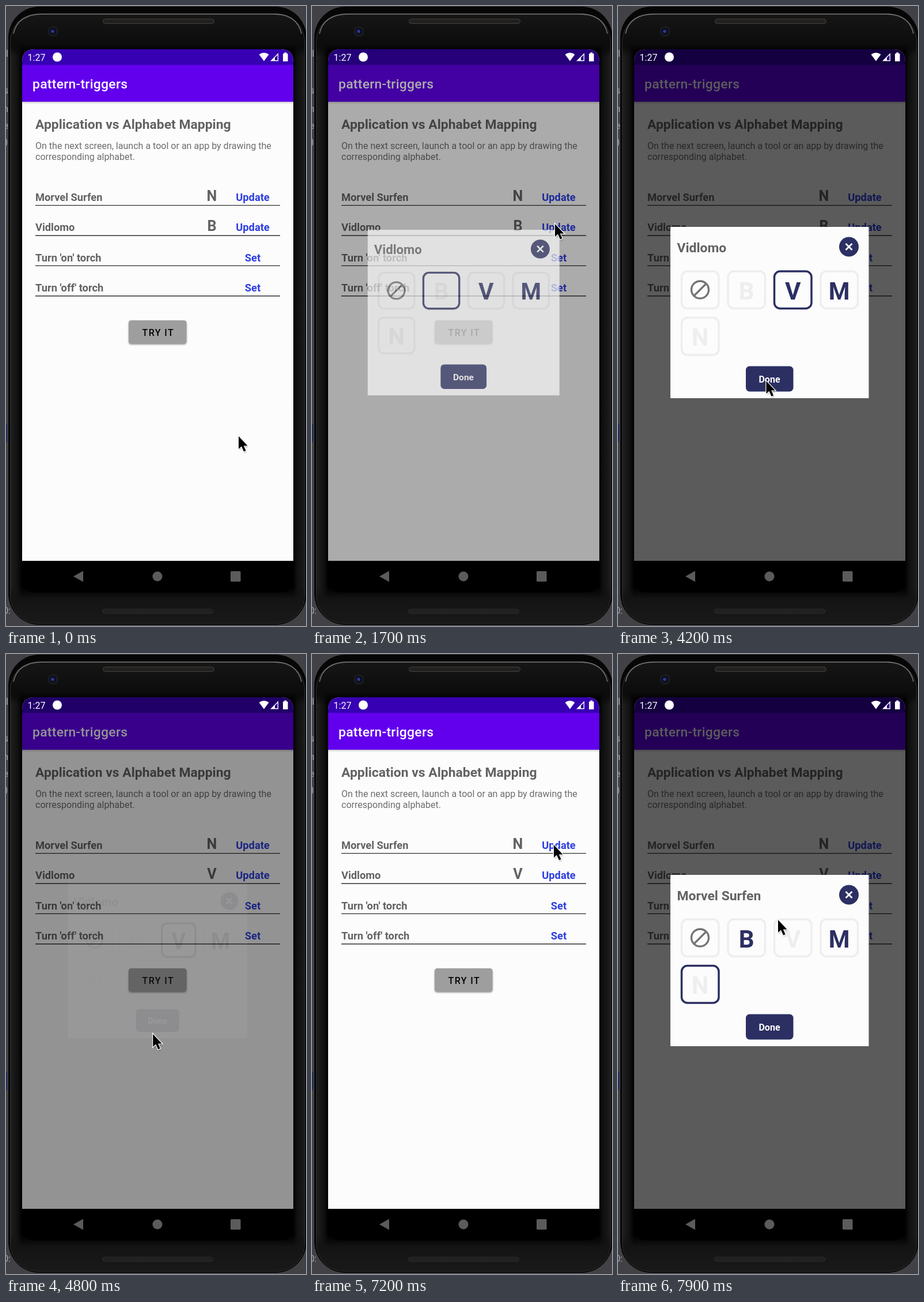
An HTML page for the animation above (8000 ms loop, 521 by 1075 pixels).

```html
<!DOCTYPE html>
<html lang="en">
<head>
<meta charset="utf-8">
<title>pattern-triggers</title>
<style>
  html, body { margin: 0; width: 100%; height: 100%; overflow: hidden; background: #424246; }
  svg { display: block; width: 521px; height: 1075px; }
  text { font-family: Roboto, sans-serif; white-space: pre; }
  .bold { font-weight: 700; }
  .mid { text-anchor: middle; }
  .title { font-size: 22.9px; font-weight: 700; fill: #626262; }
  .body { font-size: 16.04px; fill: #6d6d6d; }
  .row { font-size: 18.3px; font-weight: 700; fill: #626262; }
  .key { font-size: 25.2px; font-weight: 700; fill: #626262; }
  .link { font-size: 18.3px; font-weight: 700; fill: #2c3fe0; }
  .glyph { font-size: 42px; font-weight: 700; }
  .edge { font-size: 16px; fill: #a4a4a8; text-anchor: end; }
</style>
</head>
<body>
<svg viewBox="0 0 521 1075">
  <defs>
    <linearGradient id="side">
      <stop offset="0" stop-color="#202020"/><stop offset=".026" stop-color="#101010"/>
      <stop offset=".04" stop-color="#000"/><stop offset=".96" stop-color="#000"/>
      <stop offset=".975" stop-color="#101010"/><stop offset="1" stop-color="#1c1c1c"/>
    </linearGradient>
    <linearGradient id="ends" x2="0" y2="1">
      <stop offset="0" stop-color="#161616"/><stop offset=".05" stop-color="#0c0c0c"/>
      <stop offset=".07" stop-color="#000" stop-opacity="0"/>
      <stop offset=".94" stop-color="#101010" stop-opacity="0"/>
      <stop offset=".96" stop-color="#141414"/><stop offset="1" stop-color="#191919"/>
    </linearGradient>
    <linearGradient id="barShadow" x2="0" y2="1">
      <stop offset="0" stop-opacity=".2"/><stop offset="1" stop-opacity="0"/>
    </linearGradient>
    <pattern id="mesh" width="3" height="3" patternUnits="userSpaceOnUse">
      <rect width="3" height="3" fill="#1b1b1b"/><circle cx="1.5" cy="1.5" r=".8" fill="#383838"/>
    </pattern>
    <clipPath id="screen">
      <path d="M28 1017V97Q28 75 50 75H477Q499 75 499 97V993Q499 1017 475 1017H52Q28 1017 28 993Z"/>
    </clipPath>
    <filter id="soft" x="-50%" y="-50%" width="200%" height="200%"><feGaussianBlur stdDeviation="1.6"/></filter>
  </defs>

  <!-- Desktop and phone body -->
  <rect width="521" height="1075" fill="#424246"/>
  <g class="edge">
    <text x="4" y="88">l</text><text x="4" y="152">s</text><text x="4" y="184">n</text>
    <text x="4" y="213">e</text><text x="3" y="241">)</text><text x="8" y="1054">0:</text>
  </g>
  <rect y="725" width="2" height="31" fill="#1d2a60"/>
  <rect x="4" y="1" width="518" height="1072" rx="54" fill="#060606"/>
  <rect x="7.5" y="13.5" width="511" height="1057" rx="48" fill="url(#side)"/>
  <rect x="7.5" y="13.5" width="511" height="1057" rx="48" fill="url(#ends)" stroke="#303030"/>
  <path d="M13 48Q20 14 64 14H464Q506 14 513 48" fill="none" stroke="#777" stroke-width="1.5"/>
  <rect x="168.5" y="22.5" width="193" height="8" rx="4" fill="url(#mesh)" stroke="#4a423b"/>
  <rect x="167.5" y="1045.5" width="192" height="8" rx="4" fill="url(#mesh)" stroke="#292929"/>
  <circle cx="81.5" cy="44" r="9.5" fill="#191a20"/>
  <circle cx="81.5" cy="44" r="5.5" fill="#0a0b1c"/>
  <circle cx="81" cy="44" r="2.8" fill="#2b3c94"/>

  <g clip-path="url(#screen)">
    <rect x="28" y="75" width="471" height="887" fill="#fcfcfc"/>
    <rect x="28" y="75" width="471" height="27" fill="#3700b3"/>
    <rect x="28" y="102" width="471" height="64" fill="#6200ee"/>
    <rect x="28" y="166" width="471" height="4" fill="url(#barShadow)"/>
    <text x="46" y="143" font-size="22.9" font-weight="500" letter-spacing=".286" fill="#fff">pattern-triggers</text>

    <text class="title" x="51" y="213">Application vs Alphabet Mapping</text>
    <text class="body" x="51" y="248">On the next screen, launch a tool or an app by drawing the</text>
    <text class="body" x="51" y="267">corresponding alphabet.</text>
    <g id="rows"></g>

    <rect x="213" y="547" width="100.5" height="40" rx="4.5" opacity=".4" filter="url(#soft)"/>
    <rect x="213" y="545" width="100.5" height="40.5" rx="4.5" fill="#9e9e9e"/>
    <text x="236.5" y="571.5" font-size="16.04" font-weight="500" letter-spacing="1.43">TRY IT</text>
    <rect id="dim" x="28" y="75" width="471" height="887"/>

    <!-- Status icons and navigation stay bright -->
    <g fill="#fff">
      <text x="37.5" y="94.5" font-size="16.04">1:27</text>
      <circle cx="89" cy="88.5" r="8"/>
      <path d="M439.5 84Q448 78 456.5 84L448 95.5Z"/>
      <path d="M459 95.5L473 81.5V95.5Z"/>
      <path d="M467 94V89.5L471.6 85V94Z" fill="#26008a"/>
      <path d="M481 82.5H483.3V80.5H487.2V82.5H489.5V96H481Z"/>
    </g>
    <rect x="28" y="962" width="471" height="55"/>
    <g fill="#5b5b5b">
      <path d="M117 989L134 979.5V998.5Z"/>
      <circle cx="263" cy="989" r="8.5"/>
      <rect x="390" y="980" width="17.5" height="18" rx="1.5"/>
    </g>

    <g id="dialog">
      <rect x="91" y="383" width="344.5" height="297" fill="#fcfcfc"/>
      <text id="dialogTitle" class="title" x="102.5" y="427"></text>
      <circle cx="401" cy="417.5" r="17" fill="#2c2f62"/>
      <path d="M395.5 412l11 11m0-11l-11 11" stroke="#fff" stroke-width="2.8"/>
      <g id="tiles"></g>
      <g fill="none" stroke="#757575" stroke-width="3.4">
        <circle cx="142.5" cy="492" r="15"/><path d="M132 502.5L153 481.5"/>
      </g>
      <rect x="222" y="624.5" width="82.5" height="44" rx="6.5" fill="#2c2f62"/>
      <text class="bold mid" x="263" y="653" font-size="16.04" fill="#fff">Done</text>
    </g>
  </g>

  <g id="cursor">
    <path d="M0 0V22L5 17.6L9 26.5L12.6 25L8.8 16.4H15.5Z" transform="translate(1 2)" opacity=".4" filter="url(#soft)"/>
    <path d="M0 0V22L5 17.6L9 26.5L12.6 25L8.8 16.4H15.5Z" stroke="#fff" stroke-width="2.4" paint-order="stroke"/>
  </g>
</svg>

<script>
const LOOP = 8000, STEP = 100;
const NAVY = '#2c2f62', PALE = '#eeeef0';
const BROWSER = 'Morvel Surfen', VIDEO = 'Vidlomo';
const $ = id => document.getElementById(id);
const set = (el, attrs) => { for (const k in attrs) el.setAttribute(k, attrs[k]); };
const ramp = (t, start, length) => Math.min(1, Math.max(0, (t - start) / length));
const setText = (el, s) => { if (el.textContent !== s) el.textContent = s; };

const rows = [[BROWSER, 'N'], [VIDEO, 'B'], ["Turn 'on' torch", ''], ["Turn 'off' torch", '']];
$('rows').innerHTML = rows.map(([name, key], i) => {
  const y = 338 + i * 52.4;
  return `<text class="row" x="51" y="${y}">${name}</text>
    <text class="key mid" x="357.5" y="${y}">${key}</text>
    <text class="link mid" x="428.5" y="${y}">${key ? 'Update' : 'Set'}</text>
    <path d="M51 ${y + 7.6}H476" stroke="#303030" stroke-width="1.4"/>`;
}).join('');
const videoKey = document.querySelectorAll('.key')[1];

// The first tile is the empty choice, so it has no letter.
const letters = ['', 'B', 'V', 'M', 'N'];
$('tiles').innerHTML = letters.map((letter, i) => {
  const x = 110.5 + i % 4 * 80.5, y = 460 + Math.floor(i / 4) * 80.5;
  return `<g><rect x="${x}" y="${y}" width="64.5" height="64.5" rx="10" fill="none" stroke-width="3.5"/>
    <text class="glyph mid" x="${x + 32.2}" y="${y + 48.5}">${letter}</text></g>`;
}).join('');
const tiles = [...$('tiles').children];

// Pointer stops: time, x, y
const stops = [
  [0, 404, 746], [300, 404, 746], [1300, 422, 378], [1900, 422, 378],
  [2600, 321, 501], [2800, 321, 501], [3000, 312, 498], [3500, 312, 498],
  [4300, 255, 657], [4600, 255, 659], [5300, 256, 659], [6300, 424, 350],
  [6800, 420, 331], [7400, 420, 331], [7900, 278, 461], [LOOP, 278, 461]
];
function pointer(t) {
  const i = stops.findIndex(s => s[0] > t);
  const [t0, x0, y0] = stops[i - 1], [t1, x1, y1] = stops[i];
  const p = ramp(t, t0, t1 - t0), e = p * p * (3 - 2 * p);
  return [x0 + (x1 - x0) * e, y0 + (y1 - y0) * e];
}

function drawDialog(t) {
  const second = t > 6000;
  const opened = second ? 7450 : 1600, closing = second ? LOOP : 4700;
  const shown = ramp(t, opened, 150) - ramp(t, closing, 105);
  const shade = ramp(t, opened, 200) - ramp(t, closing, 290);
  const scale = 0.9 + 0.1 * shown;
  set($('dim'), { opacity: 0.64 * shade });
  set($('dialog'), {
    opacity: shown,
    transform: `translate(263.2 532) scale(${scale}) translate(-263.2 -532)`
  });
  setText($('dialogTitle'), second ? BROWSER : VIDEO);

  const taken = second ? 'VN' : 'BN';
  const chosen = second ? 'N' : t < 3100 ? 'B' : 'V';
  tiles.forEach((tile, i) => {
    const [box, label] = tile.children;
    set(box, { stroke: letters[i] === chosen ? NAVY : PALE });
    set(label, { fill: taken.includes(letters[i]) ? PALE : NAVY });
  });
}

function draw(now) {
  const t = Math.floor(now % LOOP / STEP) * STEP;
  drawDialog(t);
  setText(videoKey, t < 4700 ? 'B' : 'V');
  set($('cursor'), { transform: `translate(${pointer(t)})` });
  requestAnimationFrame(draw);
}
draw(0);
</script>
</body>
</html>
```
